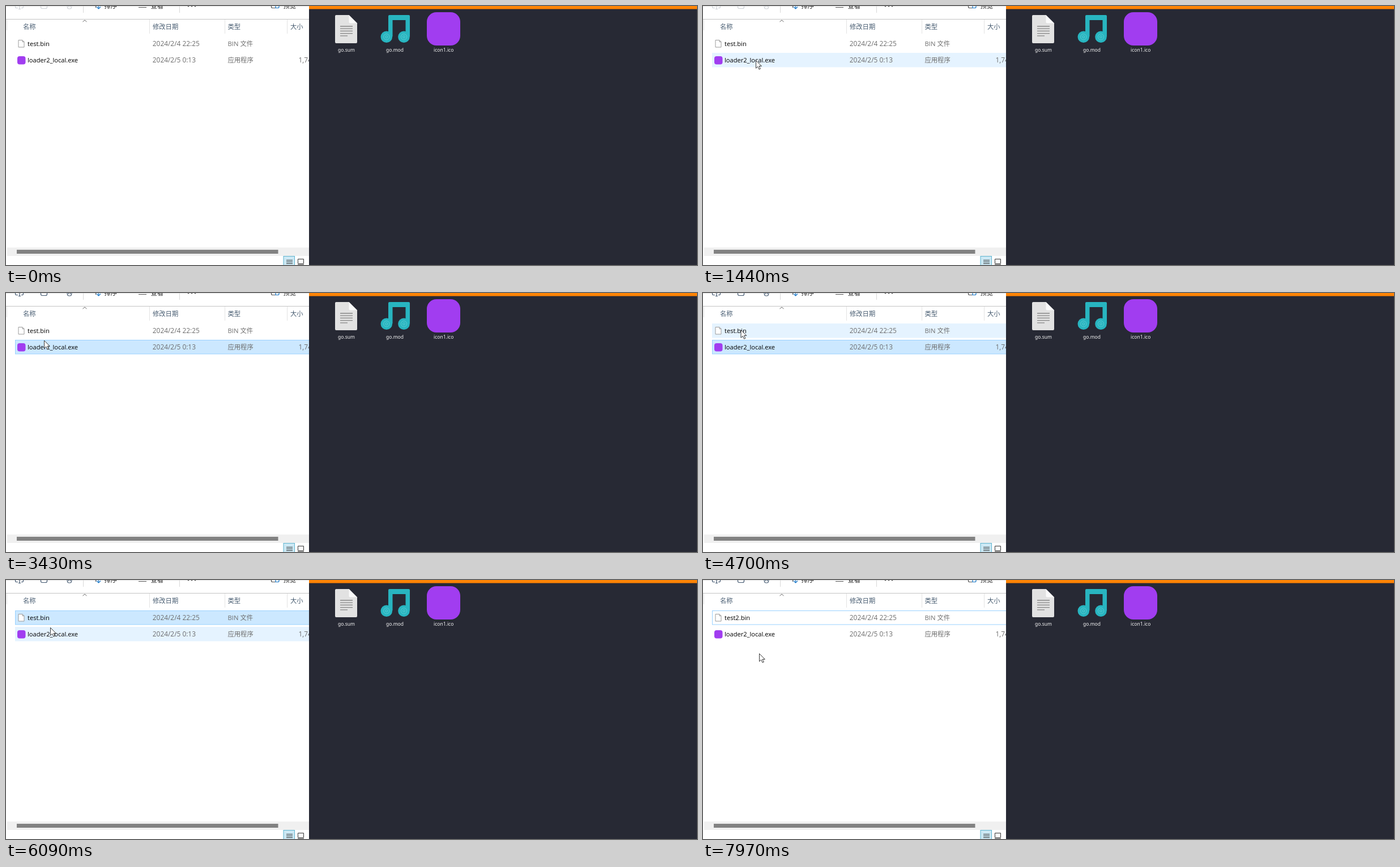
Animation, 1220 px wide and 459 px high, one loop 8000 ms. Source, as an HTML page:

```html
<!DOCTYPE html>
<html lang="zh-CN">
<head>
<meta charset="utf-8">
<style>
  html, body { margin: 0; width: 100%; height: 100%; overflow: hidden; background: #fff; }
  svg { display: block; width: 1220px; height: 459px; }
  text { font-family: "Open Sans", "Noto Sans CJK SC", "Noto Sans CJK", sans-serif; font-size: 11.3px; white-space: pre; }
  .head { fill: #465b70; }
  .name { font-size: 11.1px; fill: #000; }
  .info { fill: #6d6d6d; }
  .num { font-size: 11.9px; }
  .bar { fill: #222; }
  .label text { font-family: "Noto Sans", sans-serif; font-size: 8.5px; fill: #f4f4f4; text-anchor: middle; }
  .line { fill: none; stroke-width: 1.2; }
</style>
</head>
<body>
<svg viewBox="0 0 1220 459">
  <defs>
    <g id="page">
      <path d="M.5.5h7l3 3v9.5h-10z" fill="#fff" stroke="#9a9a9a"/>
      <path d="M7.5.5v3h3" fill="none" stroke="#9a9a9a"/>
    </g>
    <g id="disc">
      <circle r="10.3" fill="#28b5c0"/>
      <circle r="5.2" fill="none" stroke="#5ccbd3" stroke-width="1"/>
      <circle r="2" fill="none" stroke="#5ccbd3" stroke-width="1"/>
    </g>
  </defs>

  <rect width="535" height="459" fill="#fff"/>

  <!-- command bar, cut off at the top -->
  <path d="M0 .5H535" stroke="#e4e4e4"/>
  <g id="tools" class="line">
    <path d="M21 3.500H18Q16.500 3.500 16.500 1V-4M27 3.500H29Q30.500 3.500 30.500 1V-4M24 -4V5M22 5.500H26"/>
    <path d="M61.500 -4V2Q61.500 4.500 64 4.500H70Q72.500 4.500 72.500 2V0"/>
    <path d="M107.500 -4L108.500 3Q109 5 111 5H113Q115 5 115.500 3L116.500 -4M110.500 -3V2M113.500 -3V2"/>
  </g>
  <path d="M136.500 0V12M306.500 0V12" stroke="#d8d8d8"/>
  <path d="M158.500 -5V3" class="line" stroke="#555"/>
  <path d="M163.500 -5V4.500M160 1.500L163.500 5L167 1.500" class="line" stroke="#1a78c8"/>
  <text class="bar" x="173.500" y="3.600">排序</text>
  <path d="M234 -1H248M234 2.500H248" class="line" stroke="#555"/>
  <text class="bar" x="255.500" y="3.600">查看</text>
  <g fill="#333"><circle cx="322" cy="0" r="1.300"/><circle cx="328" cy="0" r="1.300"/><circle cx="334" cy="0" r="1.300"/></g>
  <path d="M476 3.500H470.500Q468.500 3.500 468.500 1.500V-4" class="line" stroke="#555"/>
  <path d="M476 -4V3.500H480Q482 3.500 482 1.500V-4" class="line" stroke="#1a78c8"/>
  <text class="bar" x="489.500" y="3.600">预览</text>

  <!-- column heads -->
  <path d="M0 23.500H535" stroke="#c4c4c4"/>
  <path d="M1.500 24V43M253.500 24V49M386.500 24V49M496.500 24V49" stroke="#e3e3e3"/>
  <path d="M135.500 28L139 25L142.500 28" fill="none" stroke="#666"/>
  <g class="head">
    <text x="30" y="40.700">名称</text>
    <text x="259" y="40.700">修改日期</text>
    <text x="391.500" y="40.700">类型</text>
    <text x="502" y="40.700">大小</text>
  </g>

  <!-- rows -->
  <rect id="row1" x="16.500" y="54.500" width="530" height="24.500"/>
  <rect id="row2" x="16.500" y="83.500" width="530" height="24.500"/>
  <use href="#page" x="21.500" y="60"/>
  <rect x="20" y="89" width="14.500" height="14.500" rx="4" fill="#a13df0"/>
  <g id="edit">
    <rect id="box" x="36.700" y="57.700" width="56" height="18" fill="#fff" stroke="#000" stroke-width="1.400"/>
    <rect id="mark" x="38" y="60" width="21" height="14" fill="#0078d7"/>
    <path id="caret" d="M0 60V74" stroke="#000"/>
  </g>
  <text class="name" x="38" y="71"><tspan id="stem">test</tspan>.bin</text>
  <text class="name" x="38" y="100">loader2_local.exe</text>
  <g class="info">
    <text class="num" x="258.800" y="71.300">2024/2/4 22:25</text>
    <text class="num" x="258.800" y="100.300">2024/2/5 0:13</text>
    <text x="391.500" y="71.200">BIN 文件</text>
    <text x="391.500" y="100.200">应用程序</text>
    <text class="num" x="516.500" y="100.300">1,74</text>
  </g>

  <!-- scroll bar and view buttons -->
  <rect x="2" y="428" width="533" height="15" fill="#f0f0f0"/>
  <rect x="19" y="432" width="461.500" height="7" fill="#828282"/>
  <rect x="490" y="443.500" width="19.500" height="17" fill="#cce8f4" stroke="#5fb4cf"/>
  <path d="M495 450.500H506M495 453.500H506M495 456.500H506" stroke="#333"/>
  <path d="M515.500 448.500H525.500V456.500H515.500ZM515 458.500H526" fill="none" stroke="#333"/>

  <!-- desktop -->
  <rect x="535" width="685" height="459" fill="#272934"/>
  <rect x="535" width="685" height="5.500" fill="#ff8405"/>
  <path d="M583 16H605.500L620 30.500V64Q620 66 618 66H583Q581 66 581 64V18Q581 16 583 16Z" fill="#e2e2e2"/>
  <path d="M605.500 16L620 30.500H607.500Q605.500 30.500 605.500 28.500Z" fill="#fafafa"/>
  <path d="M590 36H612M590 40.200H612M590 44.400H612M590 48.600H612M590 52.800H603" stroke="#858585" stroke-width="1.300"/>
  <path d="M675 54V18Q675 16 677 16H711Q713 16 713 18V54H705.500V25H682.500V54Z" fill="#28b5c0"/>
  <use href="#disc" x="671.800" y="54.700"/>
  <use href="#disc" x="702.500" y="54.700"/>
  <rect x="743" y="11" width="59" height="59" rx="17" fill="#a13df0"/>
  <g class="label">
    <text x="601" y="81">go.sum</text>
    <text x="686.500" y="81">go.mod</text>
    <text x="772.700" y="81">icon1.ico</text>
  </g>

  <path id="mouse" d="M.5.5V14.300L3.700 11.300L6 16.300L8.300 15.300L6 10.500H10.300Z" fill="#fff" stroke="#222" stroke-width=".9"/>
</svg>
<script>
  const LOOP = 8000;
  const $ = id => document.getElementById(id);

  // bursts of screen updates: start, end, steps
  const bursts = [
    [200, 960, 10], [1080, 1830, 12], [1900, 2420, 9], [2620, 2960, 6],
    [3300, 3500, 4], [4500, 4920, 6], [5180, 5870, 10], [6000, 6090, 3],
    [6240, 6310, 2], [6590, 7270, 9], [7410, 7970, 7]
  ];

  // pointer tip: time, x, y
  const path = [
    [200, 1010, 425], [540, 770, 240], [800, 523, 67], [960, 560, 90],
    [1080, 460, 96], [1284, 170, 96], [1420, 93, 96], [1580, 93, 96], [1830, 86, 65],
    [1900, 82, 62], [2100, 49, 54], [2230, 53, 58], [2420, 64.5, 62.5],
    [2620, 66, 72], [2960, 72, 86], [3300, 70, 85], [3500, 61, 81],
    [4500, 63, 76], [4660, 66.5, 65], [4920, 66.5, 65],
    [5180, 69, 71], [5410, 95, 121], [5560, 94, 117], [5870, 80, 74],
    [6000, 79, 79], [6090, 78, 84], [6240, 77, 78], [6310, 76, 70],
    [6590, 76, 65], [6845, 79, 54], [7270, 100, 92],
    [7503, 100, 92], [7780, 100, 137], [7880, 100, 134], [7970, 99, 130]
  ];

  const CLICK_EXE = 1550, CLICK_BIN = 4750, RENAME = 6755, CARET = 7410, TYPED = 7500, DONE = 7870;

  // hold the picture between updates
  function snap(t) {
    let shown = 0;
    for (const [a, b, n] of bursts) {
      if (t < a) break;
      const dt = (b - a) / (n - 1);
      shown = Math.min(b, a + Math.floor((t - a) / dt + 1e-6) * dt);
    }
    return shown;
  }

  function pointer(t) {
    const i = path.findIndex(p => p[0] > t);
    if (i < 0) return path[path.length - 1].slice(1);
    if (i === 0) return path[0].slice(1);
    const [a, x, y] = path[i - 1], [b, u, v] = path[i];
    const k = (t - a) / (b - a);
    return [x + (u - x) * k, y + (v - y) * k];
  }

  const show = (id, on) => $(id).setAttribute("visibility", on ? "inherit" : "hidden");

  function paintRow(id, hover, picked, framed) {
    $(id).setAttribute("fill", picked ? "#cce8ff" : hover ? "#e5f3ff" : "#fff");
    $(id).setAttribute("stroke", framed ? "#99d1ff" : picked ? "#cce8ff" : hover ? "#e5f3ff" : "#fff");
  }

  function draw(now) {
    const t = snap(now % LOOP);
    const [x, y] = pointer(t);
    const inList = t >= 200 && x < 535;
    const exe = t >= CLICK_EXE && t < CLICK_BIN;
    const bin = t >= CLICK_BIN && t < DONE;
    const editing = t >= RENAME && t < DONE;
    const typed = t >= TYPED;

    $("mouse").setAttribute("transform", `translate(${x.toFixed(1)} ${y.toFixed(1)})`);
    show("mouse", t >= 200);
    paintRow("row1", inList && y >= 53 && y < 81, bin, t >= CLICK_BIN && !editing);
    paintRow("row2", inList && y >= 81 && y < 110, exe, exe);
    $("tools").setAttribute("stroke", t >= CLICK_EXE ? "#41566e" : "#cdd1d6");

    show("edit", editing);
    show("mark", editing && t < CARET);
    show("caret", editing && t >= CARET);
    $("box").setAttribute("width", typed ? 62.5 : 56);
    $("caret").setAttribute("transform", `translate(${typed ? 65.5 : 59.5} 0)`);
    $("stem").textContent = typed ? "test2" : "test";
    $("stem").setAttribute("fill", editing && t < CARET ? "#fff" : "#000");
  }

  const start = performance.now();
  function tick() {
    draw(performance.now() - start);
    requestAnimationFrame(tick);
  }
  tick();
</script>
</body>
</html>
```
